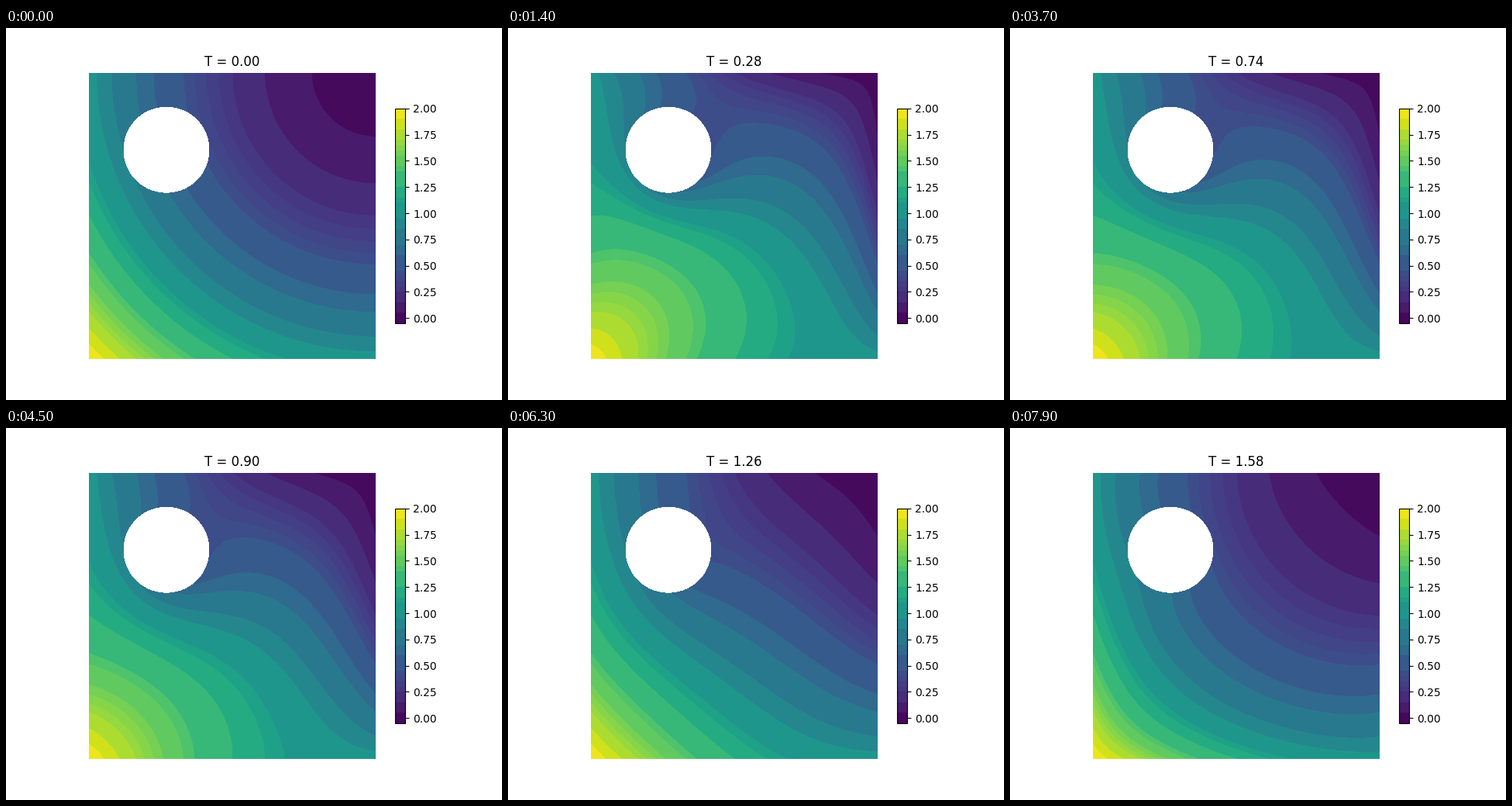
Write a matplotlib script that moves like this. It is 640 px wide and 480 px high and loops after 8 s.

```python
import numpy as np
import matplotlib.pyplot as plt
from matplotlib.animation import FuncAnimation
from matplotlib.cm import ScalarMappable
from matplotlib.colors import BoundaryNorm, ListedColormap

FRAMES, INTERVAL, DT = 80, 100, 0.02
N, SUBSTEPS = 81, 120
DIFFUSION, SPEED = 0.2, 0.95
HOLE, RADIUS = (0.27, 0.7305), 0.1487

LEVELS = [-0.05, 0.05, 0.15, 0.25, 0.3, 0.35, 0.4, 0.45, 0.6, 0.7, 0.85, 0.95,
          1.1, 1.15, 1.25, 1.4, 1.45, 1.55, 1.6, 1.65, 1.7, 1.8, 1.9, 2.0]
mids = (np.array(LEVELS[:-1]) + LEVELS[1:]) / 2
COLORS = plt.get_cmap("viridis")((mids + 0.05) / 2.05)

axis = np.linspace(0, 1, N)
X, Y = np.meshgrid(axis, axis)
START = (1 - X) ** 2 + (1 - Y) ** 2
solid = np.hypot(X - HOLE[0], Y - HOLE[1])[1:-1, 1:-1] <= RADIUS


def solve():
    """Advection-diffusion with a diagonal wind that swings back and forth."""
    h, dt = axis[1], DT / SUBSTEPS
    u, t = START.copy(), 0.0
    fixed = START[1:-1, 1:-1]
    fields = [u.copy()]
    for _ in range(FRAMES - 1):
        for _ in range(SUBSTEPS):
            wind = SPEED * np.cos(np.pi * t / 2)
            left, right = u[1:-1, :-2], u[1:-1, 2:]
            down, up = u[:-2, 1:-1], u[2:, 1:-1]
            mid = u[1:-1, 1:-1]
            spread = DIFFUSION * (left + right + down + up - 4 * mid) / h**2
            drift = wind * (right - left + up - down) / (2 * h)
            u[1:-1, 1:-1] = np.where(solid, fixed, mid + dt * (spread - drift))
            t += dt
        fields.append(u.copy())
    return np.clip(fields, -0.0499, 1.9999)


fields = solve()

fig, ax = plt.subplots(figsize=(6.4, 4.8), dpi=100)
ax.set(xlim=(0, 1), ylim=(0, 1), aspect="equal")
ax.axis("off")
title = ax.set_title("T = 0.00")
ax.add_patch(plt.Circle(HOLE, RADIUS, color="white", lw=0, zorder=3,
                        antialiased=False))

bands = ScalarMappable(BoundaryNorm(LEVELS, len(COLORS)), ListedColormap(COLORS))
bar = fig.colorbar(bands, ax=ax, shrink=0.75, spacing="proportional",
                   ticks=np.arange(0, 2.01, 0.25), format="%.2f")
bar.minorticks_off()

layer = None


def update(i):
    global layer
    if layer is not None:
        layer.remove()
    layer = ax.contourf(X, Y, fields[i], levels=LEVELS, colors=COLORS, zorder=1)
    title.set_text(f"T = {i * DT:.2f}")
    return layer, title


anim = FuncAnimation(fig, update, frames=FRAMES, interval=INTERVAL,
                     init_func=lambda: (), repeat=True, repeat_delay=0, blit=False)
plt.show()
```
